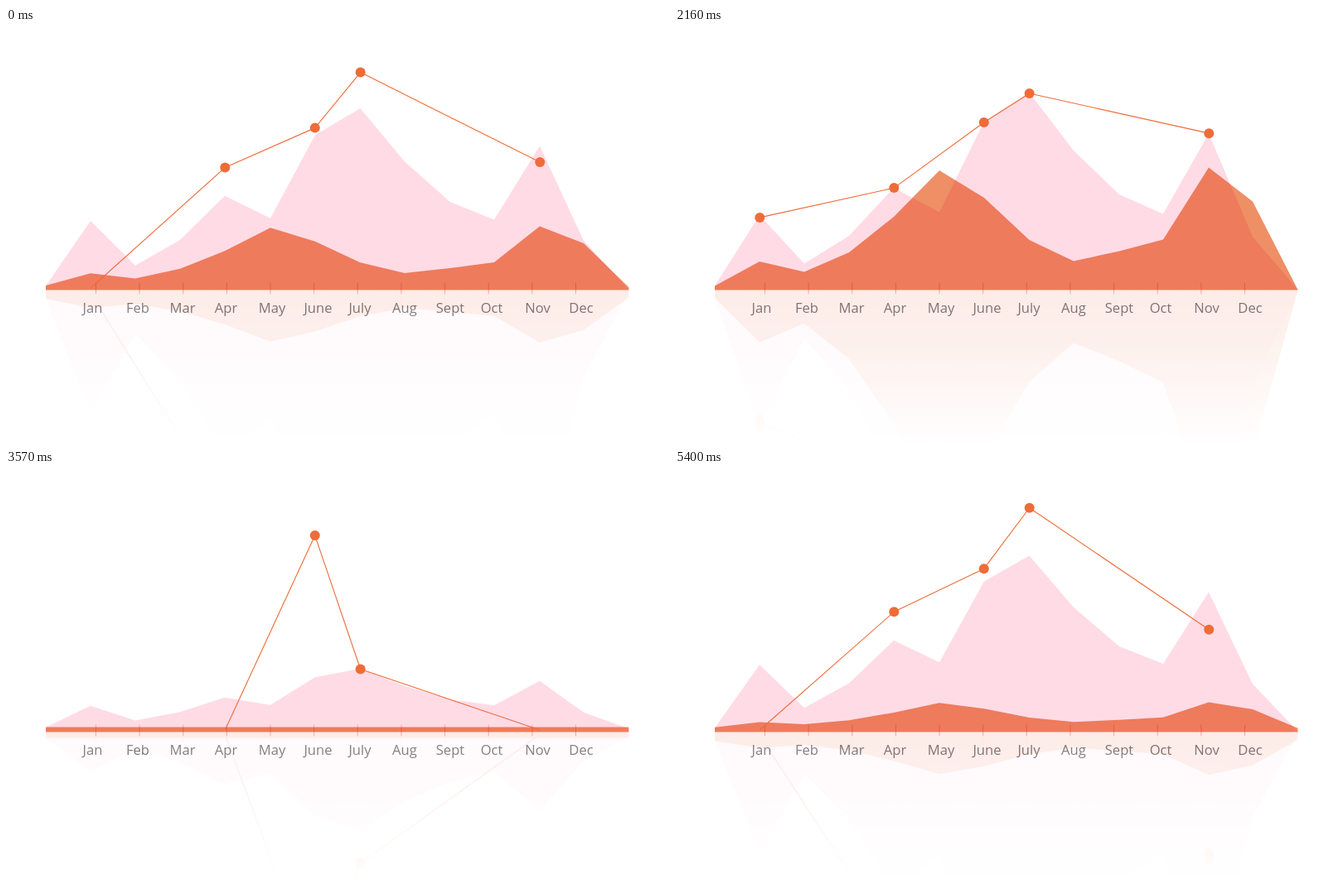
Recreate the animation shown at these times as an HTML page. Size 800x500 px, loop 5.43 s.

```html
<!DOCTYPE html>
<html lang="en">
<head>
<meta charset="utf-8">
<title>Yearly chart</title>
<style>
  html, body { margin: 0; width: 100%; height: 100%; overflow: hidden; background: #fff; }
  svg { display: block; width: 800px; height: 500px; }
  .labels { font: 16.6px "Open Sans", "Noto Sans", sans-serif; fill: #727272; text-anchor: middle; }
  .pink { fill: #ffdbe6; }
  .orange { fill: #ee8f66; mix-blend-mode: multiply; }
  .ticks { stroke: #f2a9a0; stroke-width: 1; }
  .line { fill: none; stroke: #ee6c38; stroke-width: 1.1; }
  .dots { fill: #ee6c38; }
</style>
</head>
<body>
<svg viewBox="0 0 800 500">
  <defs>
    <linearGradient id="fade" gradientUnits="userSpaceOnUse" x1="0" y1="317" x2="0" y2="500">
      <stop offset="0" stop-color="#fff" stop-opacity=".14"/>
      <stop offset=".35" stop-color="#fff" stop-opacity=".115"/>
      <stop offset="1" stop-color="#fff" stop-opacity=".005"/>
    </linearGradient>
    <mask id="veil" maskUnits="userSpaceOnUse" x="0" y="317" width="800" height="183">
      <rect y="317" width="800" height="183" fill="url(#fade)"/>
    </mask>
  </defs>
  <g class="labels" id="labels"></g>
  <g mask="url(#veil)"><g id="mirror"></g></g>
  <g id="chart"></g>
</svg>
<script>
const LOOP = 5430, TICK = 30, TURN = 1695, EMPTY = 4314;
const TOP = 310.5, BASE = 316.5, ZERO = 314, MID = 400;
const SPRING = 1441;

const xs = [48, 102, 156, 210, 264, 319, 373, 427.5, 481, 536, 589, 644, 697, 751.5];
const pinkY = [311.5, 226, 284.5, 251, 193, 222.5, 113, 78, 148, 201, 224.5, 127.5, 252, 316];
const orangeY = [311.5, 282, 294.5, 271, 228, 172, 205, 256, 281.5, 269.5, 255.5, 168.5, 209.5, 316];
// x, resting y, start of the spring
const points = [
  [102.3, 228, 1322], [264.3, 193, 830], [372.8, 114, 492], [427.7, 79, 690], [644.3, 127.6, 978]
];
const months = [
  ["Jan", 104.5], ["Feb", 159], ["Mar", 213], ["Apr", 265.5], ["May", 321], ["June", 376.5],
  ["July", 427], ["Aug", 481], ["Sept", 536], ["Oct", 586], ["Nov", 641.5], ["Dec", 694]
];

const NS = "http://www.w3.org/2000/svg";
function add(parent, tag, attrs) {
  const el = parent.appendChild(document.createElementNS(NS, tag));
  for (const k in attrs) el.setAttribute(k, attrs[k]);
  return el;
}

const clamp = v => Math.max(0, Math.min(1, v));
const part = (s, start, len) => clamp((s - start) / len);
const easeOut = p => 1 - (1 - p) ** 2;
const inOut = (p, n) => p < 0.5 ? (2 * p) ** n / 2 : 1 - (2 - 2 * p) ** n / 2;
const elastic = p => p <= 0 ? 0 : p >= 1 ? 1 : 1 - 2 ** (-10 * p) * Math.cos(4 * Math.PI * p);
const swell = s => s < 1086
  ? 0.212 * part(s, 770, 316) ** 2.5
  : 1 - 0.788 * Math.exp((1086 - s) / 66);

// Place on the build-up timeline, which plays forward and then back
function place(t) {
  t = (t + LOOP) % LOOP;
  return t < TURN ? t + LOOP - EMPTY : Math.abs(t - EMPTY);
}

function area(ys, rise, width) {
  if (width < 0.001) return "";
  const px = x => (MID + (x - MID) * width).toFixed(2);
  const top = ys.map((y, i) => px(xs[i]) + " " + (TOP + (y - TOP) * rise).toFixed(2));
  return `M${px(xs[0])} ${BASE}L${top.join("L")}L${px(xs[13])} ${BASE}Z`;
}

function build(root) {
  const pink = add(root, "path", { class: "pink" });
  const ticks = add(root, "path", { class: "ticks" });
  const orange = add(root, "path", { class: "orange" });
  const line = add(root, "path", { class: "line" });
  const group = add(root, "g", { class: "dots" });
  const dots = points.map(p => add(group, "circle", { cx: p[0], r: 6 }));

  return s => {
    pink.setAttribute("d", area(pinkY, easeOut(part(s, 631, 680)), inOut(part(s, 0, 720), 4)));
    orange.setAttribute("d", area(orangeY, swell(s), inOut(part(s, 139, 655), 4)));

    const half = 6.8 * inOut(part(s, 180, 450), 2);
    let d = "";
    for (let i = 0; half > 0 && i < 12; i++)
      d += `M${108.5 + i * 52.64} ${314.3 - half}v${2 * half}`;
    ticks.setAttribute("d", d);

    const ys = points.map(([, y, start]) => ZERO + (y - ZERO) * elastic((s - start) / SPRING));
    d = "";
    dots.forEach((dot, i) => {
      const up = s > points[i][2];
      dot.setAttribute("cy", ys[i]);
      dot.setAttribute("visibility", up ? "visible" : "hidden");
      if (i && (up || s > points[i - 1][2]))
        d += `M${points[i - 1][0]} ${ys[i - 1]}L${points[i][0]} ${ys[i]}`;
    });
    line.setAttribute("d", d);
  };
}

const labels = document.getElementById("labels");
for (const [name, x] of months) add(labels, "text", { x, y: 344.3 }).textContent = name;

const mirror = document.getElementById("mirror");
const drawChart = build(document.getElementById("chart"));
const drawMirror = build(mirror);

function render(now) {
  const t = Math.floor((now % LOOP) / TICK) * TICK;
  const s = place(t);
  drawChart(s);

  // The reflection trails slightly and stretches as the chart rises
  const back = t >= TURN && t < EMPTY;
  const stretch = 1.22 + 0.61 * part(s, back ? 1014 : 700, 330);
  mirror.setAttribute("transform", `translate(0 ${BASE * (1 + stretch)}) scale(1 ${-stretch})`);
  drawMirror(place(t - 36));
}

let begin;
function frame(now) {
  begin ??= now;
  render(Math.max(0, now - begin));
  requestAnimationFrame(frame);
}
render(0);
requestAnimationFrame(frame);
</script>
</body>
</html>
```
